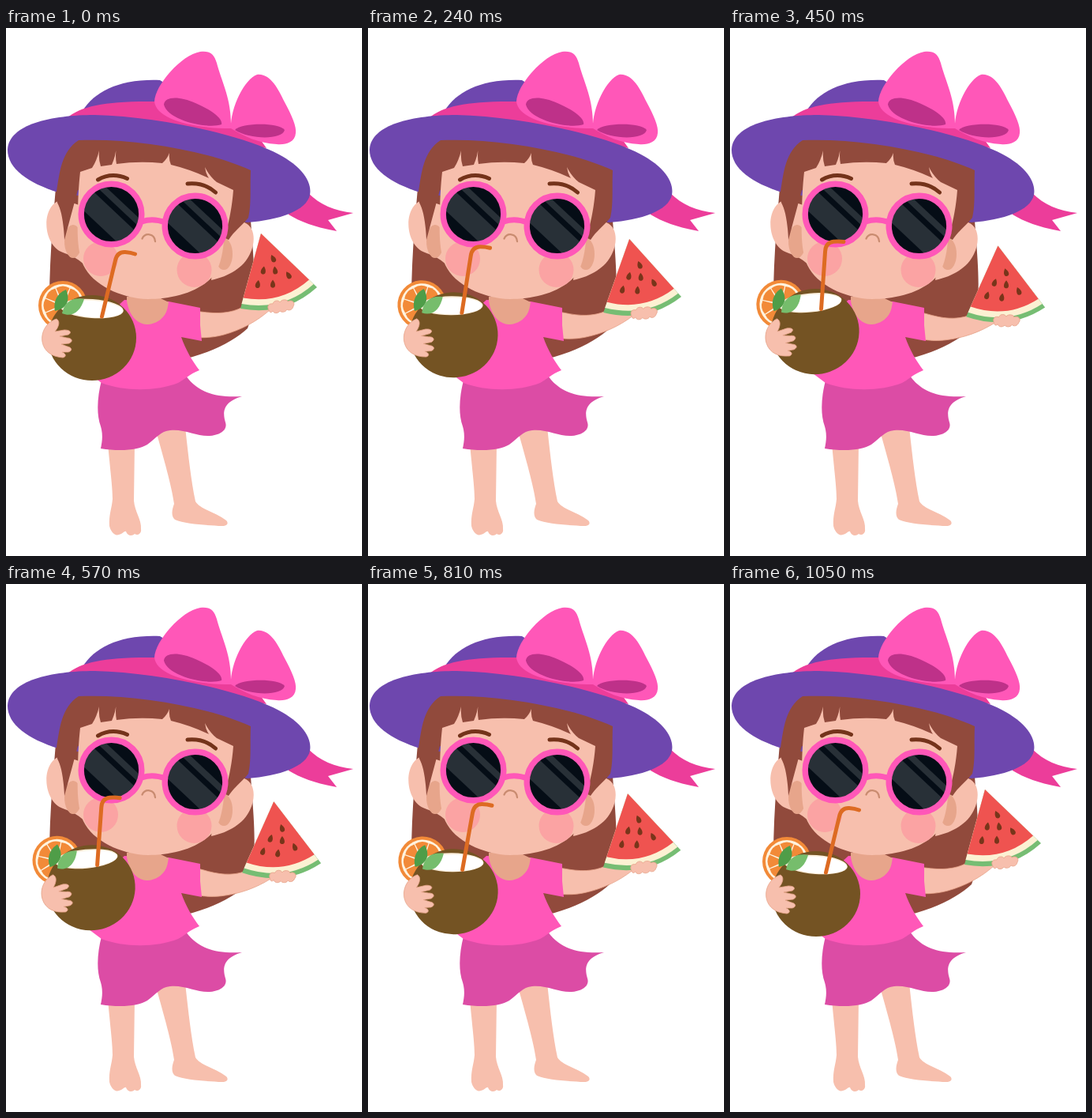
Write an HTML page that moves like this. It is 451x668 px and loops after 1.08 s.

```html
<!DOCTYPE html>
<html lang="en">
<head>
<meta charset="utf-8">
<title>Summer girl</title>
<style>
  html, body { margin: 0; width: 100%; height: 100%; overflow: hidden; background: #fff; }
  svg { display: block; width: 451px; height: 668px; }
  .skin { fill: #f7bfad; }
  .shade { fill: #e7a58b; }
  .hair { fill: #914a3c; }
  .hat { fill: #6e47ae; }
  .band { fill: #ec3d9a; }
  .pink { fill: #ff57b8; }
  .fold { fill: #be3189; }
  .blush { fill: #fba3a3; }
  .line { fill: none; stroke-linecap: round; stroke-linejoin: round; }
  .edge { stroke: #e7a58b; stroke-width: .8; }
</style>
</head>
<body>
<svg viewBox="0 0 451 668">
  <defs>
    <clipPath id="round"><circle r="35"/></clipPath>
    <g id="lens">
      <circle r="38" fill="#050d16"/>
      <g clip-path="url(#round)" stroke="#283037">
        <path d="M-22-43L44 19" stroke-width="8"/>
        <path d="M-38-25L28 37" stroke-width="26"/>
      </g>
      <circle r="38.3" class="line" stroke="#ff57b8" stroke-width="7.4"/>
    </g>
    <path id="seed" d="M0-5.5C2-3 3.3-.5 3 2C2.5 5.5-2.5 5.5-3 2C-3.3-.5-2-3 0-5.5Z" fill="#78351a"/>
  </defs>

  <!-- back hair -->
  <path class="hair" d="M64 190C60 240 55 290 55 345L70 362L160 362L215 420C250 416 290 396 306 380C320 345 314 300 309 230L300 180Z"/>

  <!-- legs and skirt -->
  <path class="skin" d="M129 525C132 560 135 580 135 596C134 608 130 616 131 630C133 638 138 643 143 641C148 640 150 636 152 637C154 643 160 643 163 640C167 643 172 639 171 634C172 622 163 612 162 598L163 525Z"/>
  <path class="skin" d="M190 510C200 545 210 580 213 602C210 610 209 618 214 622C228 628 255 629 274 630C281 630 282 626 279 623C266 613 246 609 240 599C234 570 231 540 227 505Z"/>
  <path d="M121 446C116 465 114 488 120 504C123 514 122 523 120 532C145 536 168 534 179 527C190 519 196 510 208 509C226 507 242 517 258 516C272 515 281 508 278 499C274 486 275 473 299 466C265 468 243 461 228 440Z" fill="#dc4ca5"/>

  <!-- raised arm with melon -->
  <g id="arm">
    <path class="skin edge" d="M225 357L247 359C268 362 285 361 300 353L336 350L334 357C318 371 298 382 276 388C262 392 246 393 225 390Z"/>
    <path d="M323 260L394 328Q353 365 297 355Z" fill="#76bd73"/>
    <path d="M323 260L389.7 324Q352 358 298.5 349Z" fill="#fcf1d3"/>
    <path d="M323 260L384 318.5Q348 350 300.6 341.5Z" fill="#ef5350"/>
    <use href="#seed" transform="translate(338.5 292) rotate(-25)"/>
    <use href="#seed" transform="translate(326 307) rotate(10)"/>
    <use href="#seed" transform="translate(341 307) rotate(-8)"/>
    <use href="#seed" transform="translate(358 313) rotate(-30)"/>
    <use href="#seed" transform="translate(319 324.5) rotate(10)"/>
    <use href="#seed" transform="translate(338 324)"/>
    <path class="skin edge" d="M333 357C330 352 333 348 338 349C339 344 346 344 347 347C349 343 356 343 357 346C362 343 367 347 364 352C363 357 358 358 356 356C354 360 349 360 347 358C344 362 339 361 338 358C336 361 334 360 333 357Z"/>
  </g>

  <!-- shirt and neck -->
  <path class="pink" d="M150 344L206 346L246 354L246 376L248 396L222 391C228 408 236 421 245 433C232 438 226 445 218 449C190 460 150 460 121 449L105 437L110 380Z"/>
  <path class="shade" d="M153 340L192 340L206 347L205 352C203 367 190 375 178 375C166 374 156 364 153 345Z"/>

  <!-- hat -->
  <path class="band" d="M358 234L382 208C398 224 416 231 440 234L408 243L419 257C396 253 374 246 358 236Z"/>
  <path class="hat" d="M97 105C112 80 145 64 195 66L300 130L200 130Z"/>
  <path class="band" d="M77 114C95 98 130 92 190 93L320 138L330 152L180 125Z"/>
  <path class="hat" d="M2 154C3 122 58 110 112 110C195 112 290 134 338 156C374 173 388 194 385 211C381 231 346 243 306 246L66 208C28 196 2 178 2 154Z"/>
  <path class="pink" d="M285 127C232 127 190 114 188 93C189 72 222 34 246 30C261 28 265 36 268 48C275 72 286 92 285 127Z"/>
  <path class="fold" d="M200 97C201 86 220 86 240 95C261 104 275 115 273 122C255 128 205 117 200 97Z"/>
  <path class="pink" d="M285 127C284 100 303 64 318 59C335 57 345 78 352 92C363 112 368 125 367 133C366 145 354 148 343 147C320 146 302 137 285 127Z"/>
  <path class="fold" d="M290 129C298 120 345 119 353 129C350 142 308 141 290 129Z"/>

  <!-- ears, hair and face -->
  <path class="skin" d="M72 217C46 221 45 266 66 281C74 286 86 287 100 300L110 230Z"/>
  <path class="skin" d="M302 246C315 251 317 270 309 286C301 303 283 314 260 319L268 250Z"/>
  <ellipse class="shade" cx="85" cy="270" rx="11" ry="21"/>
  <ellipse class="shade" cx="276" cy="286" rx="11" ry="20"/>
  <path class="hair" d="M64 207C68 183 70 156 92 142C162 139 255 155 310 180C309 205 311 222 307 240C300 249 288 258 282 268L270 262L91 205L74 268C73 245 70 230 65 221Z"/>
  <path class="skin" d="M94 182L109 177Q115 168 118 155Q117 166 120 175L134 173Q139 162 140 149Q138 162 140 172Q168 168 198 171Q204 166 207 158Q206 166 209 173Q234 179 257 190Q253 184 252 176Q258 188 267 195L288 205C286 232 281 250 276 270C274 290 270 303 264 312C245 335 210 343 180 343C145 342 110 325 98 300C91 285 90 262 91 240C91 218 92 200 94 182Z"/>
  <circle class="blush" cx="120" cy="292" r="22"/>
  <circle class="blush" cx="238.5" cy="306" r="22"/>
  <g class="line">
    <path d="M116.5 192Q134 182 153.5 190.5M230 197Q251 195 265.5 208" stroke="#74331a" stroke-width="5"/>
    <path d="M172.5 266.5C176 259 188 259 189 270" stroke="#c98b70" stroke-width="2.3"/>
    <path d="M172 245Q186 240 202 246" stroke="#ff57b8" stroke-width="7"/>
  </g>
  <use href="#lens" x="133.5" y="235.5"/>
  <use href="#lens" x="239.5" y="250.5"/>

  <!-- coconut drink -->
  <g id="drink">
    <g transform="translate(72 351)">
      <circle r="31" fill="#f28a38"/>
      <circle r="27" fill="#fff3df"/>
      <g id="slices" fill="#f28a38"></g>
    </g>
    <ellipse cx="109" cy="392" rx="56" ry="54" fill="#745323"/>
    <ellipse cx="109" cy="355" rx="40" ry="12" transform="rotate(4 109 355)" fill="#fcefdc"/>
    <ellipse cx="111" cy="355.5" rx="37" ry="10.5" transform="rotate(4 111 355)" fill="#fff"/>
    <path d="M62 358C59 343 68 334 76 331C82 345 77 355 62 358Z" fill="#4f9d48"/>
    <path d="M71 361C74 346 85 340 99 343C95 357 85 367 71 361Z" fill="#76bd6c"/>
    <path class="line" d="M121.5 365L138.500 294Q141 283 151 283.5Q158 284 163.5 286" stroke="#dd6b22" stroke-width="5"/>
    <path class="skin edge" d="M64 368C51 372 44 385 46 397C48 409 58 416 72 417C77 416 76 412 71 410L79 410C85 408 83 404 78 403L70 400L80 399C86 396 83 392 77 392L68 390L79 388C84 385 81 382 74 382L62 384C67 378 69 371 64 368Z"/>
  </g>
</svg>
<script>
  const LOOP = 1080, STEP = 30, SWING = 1010;
  const arm = document.getElementById("arm");
  const drink = document.getElementById("drink");

  document.getElementById("slices").innerHTML = Array.from({ length: 8 }, (_, i) =>
    `<path d="M0-3L-8.5-22Q0-27 8.5-22Z" transform="rotate(${i * 45})"/>`).join("");

  function draw(now) {
    const t = Math.floor(now % LOOP / STEP) * STEP;
    const sway = (1 - Math.cos(2 * Math.PI * Math.min(t, SWING) / SWING)) / 2;
    arm.setAttribute("transform", `rotate(${9.1 * sway} 231 374)`);
    drink.setAttribute("transform", `rotate(${-9.8 * sway} 61 396)`);
  }

  const start = performance.now();
  function tick() {
    draw(performance.now() - start);
    requestAnimationFrame(tick);
  }
  tick();
</script>
</body>
</html>
```
